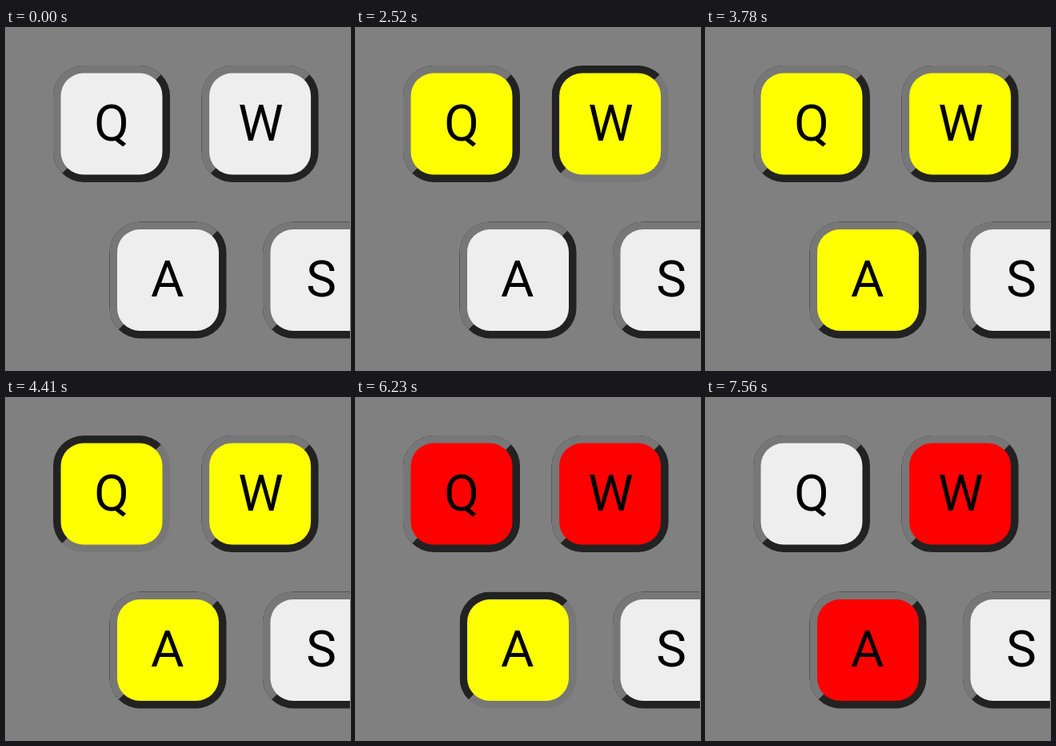
An HTML page for the animation above (8 s loop, 430 by 428 pixels).

```html
<!DOCTYPE html>
<html lang="en">
<head>
<meta charset="utf-8">
<title>Keys</title>
<style>
  html, body { margin: 0; width: 100%; height: 100%; overflow: hidden; background: #808080; }
  svg { display: block; width: 430px; height: 428px; }
  text { font: 400 63.5px Roboto, sans-serif; text-anchor: middle; fill: #000; }
</style>
</head>
<body>
<svg id="stage" viewBox="0 0 430 428"></svg>
<script>
const LOOP = 8000;
const SIZE = 146, EDGE = 9.5, RADIUS = 38;
const LIT = '#777', DARK = '#222', PRESSED = '#ff0';
// Each completed press advances the face to the next colour.
const FACES = ['#eee', '#ff0', '#f00'];

const KEYS = [
  { label: 'Q', x: 59, y: 47, tx: 73, presses: [[1470, 1680], [4340, 4550], [7280, 7420]] },
  { label: 'W', x: 244.6, y: 47, tx: 73.9, presses: [[2520, 2660], [5390, 5530]] },
  { label: 'A', x: 129.5, y: 242.5, tx: 72.2, presses: [[3360, 3500], [6230, 6370]] },
  { label: 'S', x: 321, y: 242.5, tx: 73, presses: [] }
];

const stage = document.getElementById('stage');

function add(parent, name, attrs) {
  const el = document.createElementNS('http://www.w3.org/2000/svg', name);
  for (const k in attrs) el.setAttribute(k, attrs[k]);
  return parent.appendChild(el);
}

function roundRect(parent, inset, extra) {
  const side = SIZE - 2 * inset;
  return add(parent, 'rect', {
    x: inset, y: inset, width: side, height: side, rx: RADIUS - inset, ...extra
  });
}

// The bevel is split along the diagonal from top right to bottom left.
const clip = add(add(stage, 'defs', {}), 'clipPath', { id: 'upper' });
add(clip, 'path', { d: `M0 0H${SIZE}L0 ${SIZE}Z` });

for (const key of KEYS) {
  const g = add(stage, 'g', { transform: `translate(${key.x} ${key.y})` });
  key.lower = roundRect(g, 0);
  key.upper = roundRect(g, 0, { 'clip-path': 'url(#upper)' });
  key.face = roundRect(g, EDGE);
  add(g, 'text', { x: key.tx, y: 93.5 }).textContent = key.label;
}

function render(t) {
  for (const { presses, lower, upper, face } of KEYS) {
    const down = presses.some(([from, to]) => t >= from && t < to);
    const count = presses.filter(([, to]) => t >= to).length;
    lower.setAttribute('fill', down ? LIT : DARK);
    upper.setAttribute('fill', down ? DARK : LIT);
    face.setAttribute('fill', down ? PRESSED : FACES[count % FACES.length]);
  }
}

const start = performance.now();
function tick() {
  render((performance.now() - start) % LOOP);
  requestAnimationFrame(tick);
}
tick();
</script>
</body>
</html>
```
